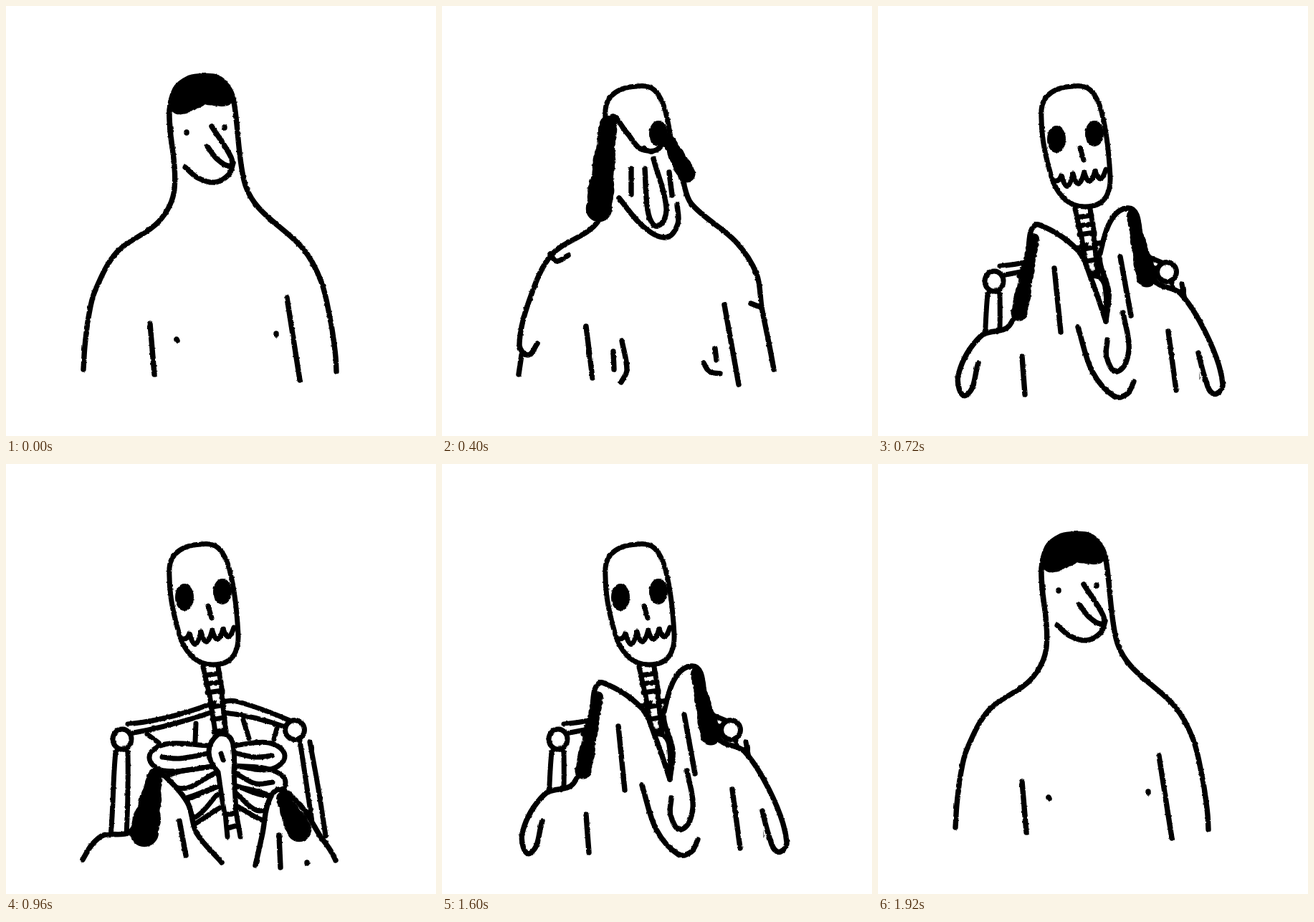
Write an HTML page that moves like this. It is 600 px wide and 600 px high and loops after 2.24 s.

```html
<!DOCTYPE html>
<html lang="en">
<head>
<meta charset="utf-8">
<title>Melting man</title>
<style>
  html, body { margin: 0; height: 100%; overflow: hidden; background: #fff; }
  svg { display: block; width: 100vw; height: 100vh; }
  path { fill: none; stroke: #000; stroke-width: 7; stroke-linecap: round; stroke-linejoin: round; }
  .solid { fill: #fff; }
  .dark { fill: #000; stroke-width: 2; }
  .skin { stroke-width: 7.4; }
  .cover { fill: #fff; stroke: #fff; stroke-width: 3; }
</style>
</head>
<body>
<svg viewBox="0 0 600 600">
  <defs>
    <filter id="rough" filterUnits="userSpaceOnUse" x="0" y="0" width="600" height="600" color-interpolation-filters="sRGB">
      <feTurbulence type="fractalNoise" baseFrequency=".25" seed="4"/>
      <feDisplacementMap in="SourceGraphic" scale="3" xChannelSelector="R" yChannelSelector="G"/>
    </filter>
    <clipPath id="floor"><path d="M0 0H600V568H0Z"/></clipPath>
  </defs>
  <g filter="url(#rough)">
    <g id="bones"></g>
    <g id="flesh" clip-path="url(#floor)"></g>
  </g>
</svg>
<script>
const bones = document.getElementById('bones');
const flesh = document.getElementById('flesh');
const mix = (a, b, k) => a + (b - a) * k;

function add(parent, cls, d = '') {
  const el = document.createElementNS('http://www.w3.org/2000/svg', 'path');
  el.setAttribute('class', cls);
  el.setAttribute('d', d);
  return parent.appendChild(el);
}

// Smooth path through a few points.
function curve(pts) {
  const dir = pts.map((p, i) => {
    const a = pts[i - 1] || p, b = pts[i + 1] || p;
    const x = b[0] - a[0], y = b[1] - a[1], len = Math.hypot(x, y) || 1;
    return [x / len, y / len];
  });
  let d = `M${pts[0]}`;
  for (let i = 1; i < pts.length; i++) {
    const p = pts[i - 1], q = pts[i], r = Math.hypot(q[0] - p[0], q[1] - p[1]) / 3;
    const c1 = [0, 1].map(c => p[c] + dir[i - 1][c] * r);
    const c2 = [0, 1].map(c => q[c] - dir[i][c] * r);
    d += `C${c1} ${c2} ${q}`;
  }
  return d;
}

const oval = (x, y, rx, ry) => `M${x - rx} ${y}a${rx} ${ry} 0 1 0 ${2 * rx} 0a${rx} ${ry} 0 1 0 ${-2 * rx} 0`;

// A row of discs between two ends [x, y, radius].
function blob([a, b]) {
  let d = '';
  for (let i = 0; i <= 14; i++) {
    const [x, y, r] = a.map((v, c) => mix(v, b[c], i / 14));
    const R = r * (1 + .07 * Math.sin(i * 1.3));
    d += oval(x, y, R, R);
  }
  return d;
}

function drawBones() {
  const line = (...pts) => add(bones, '', curve(pts));
  const solid = d => add(bones, 'solid', d);

  // arms and shoulders
  add(bones, '', 'M146 519C150 480 149 440 153 402Q162 393 170 402Q171 460 168 519');
  line([410, 386], [420, 452], [430, 519]);
  line([424, 388], [436, 454], [446, 519]);
  add(bones, '', 'M170 363Q230 357 290 333M178 375Q230 366 288 346M302 333Q312 328 325 332Q360 342 396 358M304 347Q345 351 390 367');
  add(bones, '', 'M197 377L213 389M265 362L264 387M331 357L339 383M378 369L374 384');
  solid(oval(162, 384, 13, 14));
  solid(oval(403, 371, 13.5, 13.5));

  // neck and spine
  for (const [x, w] of [[275, 21], [284, 17]]) {
    const y = x === 275 ? 283 : 322, h = x === 275 ? 36 : 52;
    line([x, y], [x + 8, y + h]);
    line([x + w, y], [x + w + 6, y + h]);
    for (let i = 1; i <= 3; i++)
      line([x + i * 2, y + h * i / 3], [x + w + i * 2, y + h * i / 3 - 3]);
  }
  line([306, 488], [309, 520]);
  line([321, 486], [327, 520]);
  line([309, 508], [324, 504]);

  // ribs: each loop goes from the breastbone to its tip and back
  const sides = [
    { tip: i => [200 + 11 * i, 409 + 41 * i], root: j => [283 + 5 * j, 393 + 29 * j], d: 1 },
    { tip: i => [389 + i, 407 + 37 * i], root: j => [318 + j, 393 + 28 * j], d: -1 }
  ];
  for (const { tip, root, d } of sides)
    for (let i = 0; i < 3; i++) {
      const [x, y] = tip(i);
      line(root(i), [x + 22 * d, y - 18], [x, y], [x + 20 * d, y + 19], root(i + 1));
      line([x + 18 * d, y], [x + 42 * d, y + 2], root(i + .35));
    }
  solid('M296 377Q283 388 283 402Q283 415 296 430Q300 460 305 488Q313 490 321 486Q319 450 318 430Q320 405 316 388Q311 374 296 377ZM300 404L303 413');

  // skull
  solid('M272 112C295 109 302 121 309 138C318 165 322 200 324 238C325 264 314 280 290 280C264 281 248 260 241 235C231 200 227 175 228 145C230 122 250 113 272 112Z');
  add(bones, 'dark', oval(249, 186, 12, 18) + oval(302, 178, 12, 17));
  line([282, 198], [287, 215]);
  let teeth = 'M247 244Q253 245 256 236';
  for (let i = 0; i < 4; i++)
    teeth += `q${8 - i / 4} ${32 - 3 * i} ${16 - i / 3} ${-2}`;
  add(bones, '', teeth);
}

// Key points of the melting skin; blobs of hair also give a radius.
const poses = {
  0: {
    skinL: '108,507 110,475 115,435 124,398 155,343 213,301 235,255 228,150 236,116 254,101 276,97',
    skinR: '272,97 296,100 313,118 319,140 332,243 352,281 414,338 440,385 453,440 457,465 460,490 461,510',
    hairL: '264,119,21 242,137,14',
    hairR: '284,116,20 306,127,12',
    nose: '287,168 314,211 313,223 295,214 281,196',
    mouth: '250,225 268,240 292,246 311,235 317,219',
    eyeL: '252,176 252,177',
    eyeR: '305,169 305,170',
    armL: '201,443 207,514',
    armR: '392,407 410,522',
    nipL: '238,465 239,467',
    nipR: '377,457 377,459'
  },
  3: {
    skinL: '133,471 120,487 108,472 122,410 153,347 218,300 230,230 236,156 258,177 275,198 293,203',
    skinR: '291,203 299,201 306,195 313,182 335,240 348,276 410,329 439,374 446,420 452,450 458,480 463,507',
    hairL: '232,165,11 219,283,18',
    hairR: '316,188,8 341,234,12',
    nose: '295,213 313,282 301,307 288,290 283,227',
    mouth: '247,268 280,307 312,323 329,304 328,277',
    eyeL: '264,227 264,263',
    eyeR: '317,232 321,264',
    armL: '201,447 210,519',
    armR: '394,417 414,528',
    nipL: '239,482 240,507',
    nipR: '381,478 383,494',
    dripL: '251,467 258,508 250,525',
    dripR: '365,498 373,510 388,513',
    hookL: '151,346 160,356 176,348',
    hookR: '431,415 446,421',
    wrist: '111,487 107,514'
  },
  7: {
    skinL: '140,498 123,543 112,515 143,461 184,445 208,365 213,315 224,305 278,340 298,382 318,440',
    skinR: '318,440 322,400 310,345 348,282 370,340 388,385 422,401 462,466 481,528 468,541 456,518 447,484',
    hairL: '217,325,7 197,428,11',
    hairR: '354,292,6 375,378,14',
    nose: '342,428 350,480 334,510 319,490 320,466',
    mouth: '279,448 299,510 330,545 348,541 357,524',
    eyeL: '246,366 255,455',
    eyeR: '338,350 353,432',
    armL: '201,489 205,542',
    armR: '405,454 416,536'
  },
  10: {
    skinL: '107,552 120,531 136,518 172,514 185,490 198,445 207,428 216,430 253,472 266,515 301,556',
    skinR: '348,560 358,515 366,472 381,454 405,470 420,488 430,505 439,520 445,528 450,535 455,543 460,553',
    hairL: '208,434,9 193,514,20',
    hairR: '386,466,8 409,510,17',
    eyeL: '242,498 251,546',
    eyeR: '381,518 383,563',
    armR: '420,556 420,557'
  },
  13: {}
};
const keys = Object.keys(poses).map(Number);
for (const pose of Object.values(poses))
  for (const name in pose)
    pose[name] = pose[name].split(' ').map(p => p.split(',').map(Number));

// The last pose is the one before it, flattened to a puddle.
for (const name in poses[10])
  poses[13][name] = poses[10][name].map(([x, y, r]) => [x, mix(564, y, .06), (r || 0) * .2]);

const covers = { skinL: add(flesh, 'cover'), skinR: add(flesh, 'cover') };
const parts = {};
for (const name in { ...poses[0], ...poses[3] })
  parts[name] = add(flesh, name.startsWith('hair') ? 'dark' : 'skin');

// Parts missing from the next pose sag and then disappear.
function between(p, q, k) {
  if (p && q) return p.map((a, i) => a.map((v, c) => mix(v, q[i][c], k)));
  if (p && k < .5) return p.map(([x, y]) => [x, y + 100 * k]);
  return k < .5 ? null : q;
}

function draw(step) {
  flesh.style.display = step > 13 ? 'none' : '';
  if (step > 13) return;
  const i = Math.max(1, keys.findIndex(k => k >= step));
  const a = keys[i - 1], b = keys[i], k = (step - a) / (b - a);
  for (const name in parts) {
    const pts = between(poses[a][name], poses[b][name], k);
    const shape = name.startsWith('hair') ? blob : p => curve(p.map(v => v.slice(0, 2)));
    const d = pts ? shape(pts) : '';
    parts[name].setAttribute('d', d);
    if (covers[name])
      covers[name].setAttribute('d', `${d}L${pts[pts.length - 1][0]} 600H${pts[0][0]}Z`);
  }
}

// Melts one step at a time, then grows back in bigger strides.
const back = [12, 10, 7, 5, 3, 1, 0];
function stepAt(t) {
  if (t < 240) return 0;
  if (t < 1440) return Math.min(14, 1 + Math.floor((t - 240) / 80));
  return back[Math.min(6, Math.floor((t - 1440) / 80))];
}

drawBones();
const start = performance.now();
let shown = -1;
function tick() {
  const step = stepAt((performance.now() - start) % 2240);
  if (step !== shown) draw(shown = step);
  requestAnimationFrame(tick);
}
tick();
</script>
</body>
</html>
```
